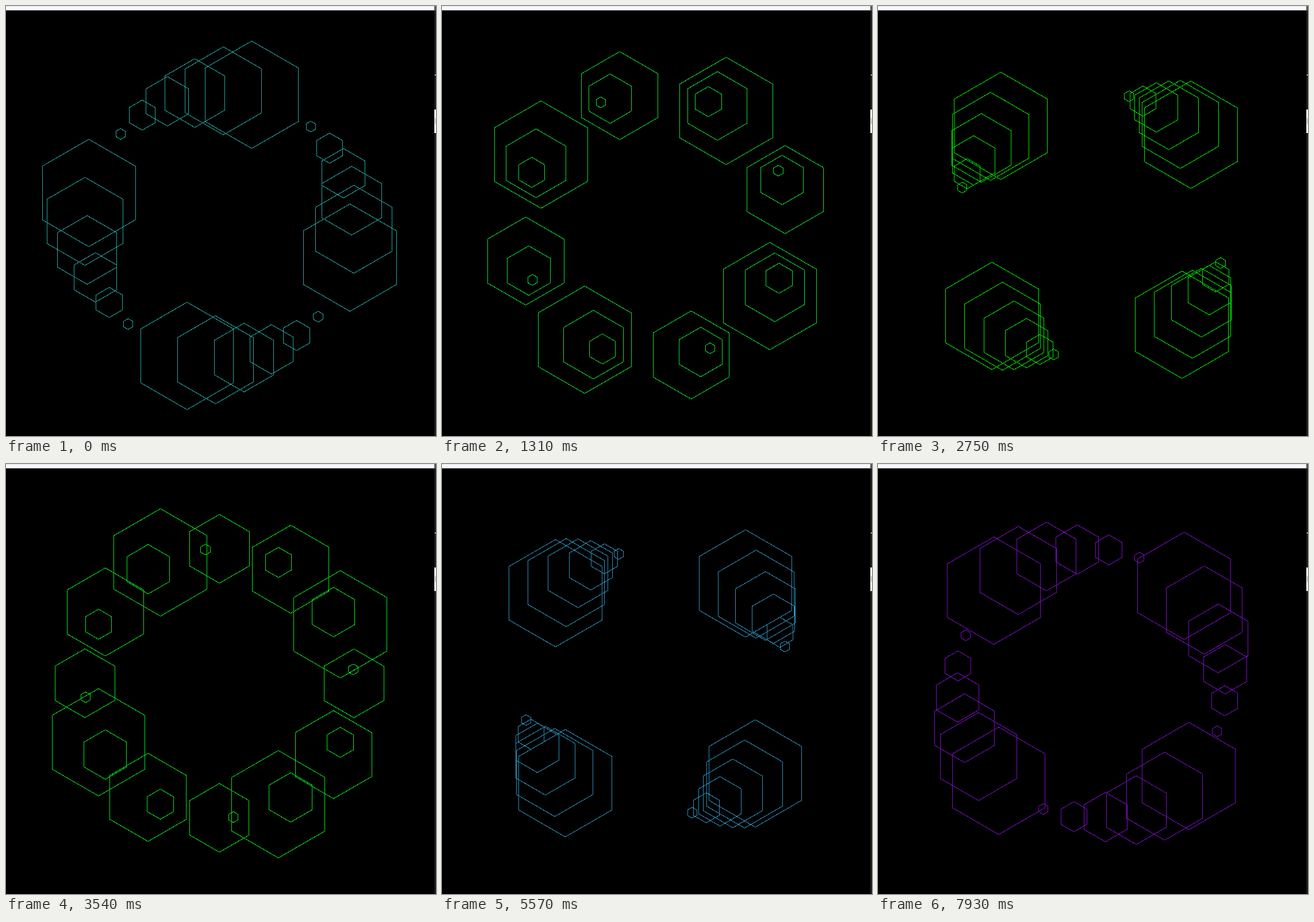
Animation, 748 px wide and 748 px high, one loop 8000 ms. Source, as an HTML page:

```html
<!DOCTYPE html>
<html lang="en">
<head>
<meta charset="utf-8">
<title>Orbiting hexagons</title>
<style>
  html, body { margin: 0; width: 100%; height: 100%; overflow: hidden; background: #000; }
  svg { display: block; width: 100vw; height: 100vh; }
</style>
</head>
<body>
<svg viewBox="0 0 748 748" shape-rendering="crispEdges">
  <rect width="748" height="748" fill="#000"/>
  <path id="rings" fill="none" stroke-width="1"/>
  <rect width="745" height="7" fill="#f8f9fc"/>
  <rect width="745" height="1" fill="#e2e4e8"/>
  <rect y="7" width="745" height="1" fill="#86888c"/>
  <rect x="745" width="3" height="748" fill="#1e1e1e"/>
  <rect x="745" width="3" height="8" fill="#55585c"/>
  <rect x="746" y="119" width="2" height="2" fill="#b8b8b8"/>
  <rect x="745" y="180" width="3" height="41" fill="#f0f0f0"/>
  <rect x="746" y="195" width="2" height="10" fill="#c4c4c4"/>
</svg>
<script>
const LOOP = 8000, CX = 371.25, CY = 381.5, ORBIT = 234, RAD = Math.PI / 180;
const path = document.getElementById('rings');

// The picture advances in discrete steps at a slightly uneven pace
const pace = [
  { ms: 0, step: 0, tick: 750.54 },
  { ms: 1300, step: 20, tick: 828.9 },
  { ms: 2737, step: 41, tick: 910 },
  { ms: 7925, step: 118, tick: 1204.38 }
];

function remap(x, from, to) {
  let i = 1;
  while (i < pace.length - 1 && pace[i][from] <= x) i++;
  const a = pace[i - 1], b = pace[i];
  return a[to] + (b[to] - a[to]) * (x - a[from]) / (b[from] - a[from]);
}

// Green at tick 900, shifting through teal and blue to violet on either side
function colour(tick) {
  const d = Math.abs(tick - 900);
  const r = 122 * (d / 304) ** 1.8;
  const g = 232 * (1 - Math.sin(0.255 * d * RAD) ** 2.6);
  const b = 232 * Math.sin(0.375 * d * RAD) ** 2;
  return `rgb(${[r, g, b].map(Math.round)})`;
}

function hexagon(x, y, r) {
  let d = '';
  for (let a = 0; a < 360; a += 60)
    d += (a ? 'L' : 'M') + (x + r * Math.sin(a * RAD)).toFixed(2) + ' ' + (y - r * Math.cos(a * RAD)).toFixed(2);
  return d + 'Z';
}

function draw(ms) {
  const tick = remap(Math.floor(remap(ms, 'ms', 'step')), 'step', 'tick');
  const swing = 90 * Math.sin(0.4 * tick * RAD);
  let d = '';
  for (let ring = 1; ring <= 6; ring++) {
    const r = 16.8 * ring - 7.4;
    for (let arm = 0; arm < 4; arm++) {
      const angle = (tick + ring * swing + arm * 90) * RAD;
      d += hexagon(CX + ORBIT * Math.sin(angle), CY - ORBIT * Math.cos(angle), r);
    }
  }
  path.setAttribute('d', d);
  path.setAttribute('stroke', colour(tick));
}

const start = performance.now();
function loop() {
  draw((performance.now() - start) % LOOP);
  requestAnimationFrame(loop);
}
loop();
</script>
</body>
</html>
```
